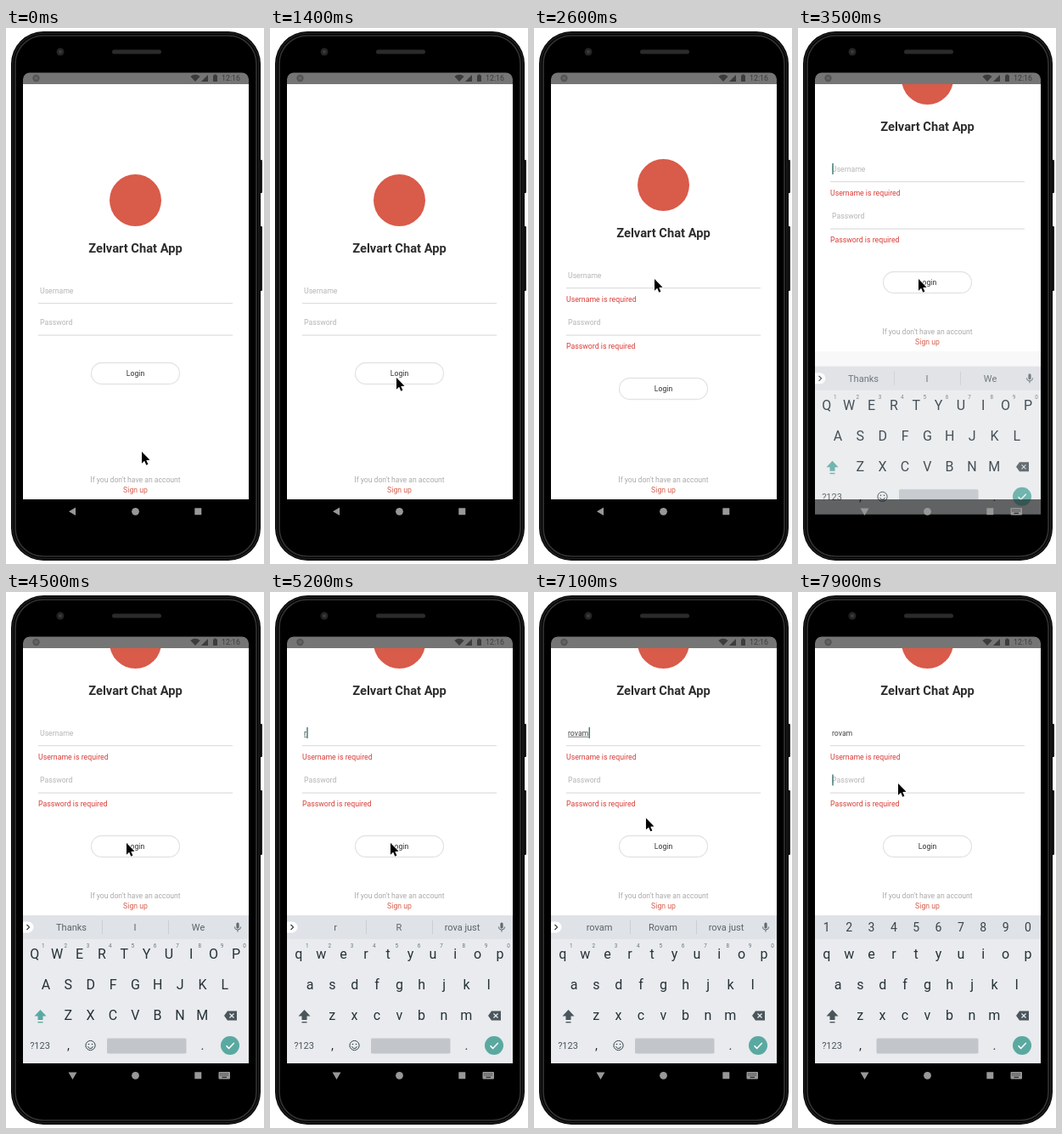
An HTML page with a canvas for the animation above (8 s loop, 304 by 630 pixels).

```html
<!DOCTYPE html>
<html lang="en">
<head>
<meta charset="utf-8">
<title>Login form</title>
<style>
html, body { margin: 0; width: 100%; height: 100%; overflow: hidden; background: #fff; }
canvas { display: block; width: 304px; height: 630px; }
</style>
</head>
<body>
<canvas></canvas>
<script>
const W = 304, H = 630, LOOP = 8000;
const RED = '#d95b4a', ERROR = '#d93d38', TEAL = '#5aa9a1', INK = '#37474f';
const NAME = 'rovam';

// Timeline in ms
const ERRORS_AT = 1650, FOCUS_AT = 2900, RESIZE_AT = 3400, KEYBOARD_AT = 3450, PASSWORD_AT = 7700;
const KEY_TIMES = [5100, 5300, 5500, 5700, 5900];
const CARET_RESETS = [FOCUS_AT, RESIZE_AT, ...KEY_TIMES, PASSWORD_AT];
const POINTER = [
  [0, 160, 498], [200, 160, 498], [1100, 149, 411], [1750, 149, 411],
  [2400, 142, 295], [6700, 142, 295], [7600, 118, 225], [LOOP, 118, 225]
];

const canvas = document.querySelector('canvas');
const dpr = window.devicePixelRatio || 1;
canvas.width = W * dpr;
canvas.height = H * dpr;
const c = canvas.getContext('2d');

const smooth = p => p * p * (3 - 2 * p);
const clamp = v => Math.max(0, Math.min(1, v));

function box(x, y, w, h, color, r = 0) {
  c.fillStyle = color;
  c.beginPath();
  c.roundRect(x, y, w, h, r);
  c.fill();
}

function outline(x, y, w, h, color, r, width = 1) {
  c.strokeStyle = color;
  c.lineWidth = width;
  c.beginPath();
  c.roundRect(x, y, w, h, r);
  c.stroke();
}

function disc(x, y, r, color) {
  c.fillStyle = color;
  c.beginPath();
  c.arc(x, y, r, 0, 7);
  c.fill();
}

function path(points, closed = true) {
  c.beginPath();
  points.forEach(([x, y]) => c.lineTo(x, y));
  if (closed) c.closePath();
}

function poly(points, color) {
  path(points);
  c.fillStyle = color;
  c.fill();
}

function line(points, color, width = 1) {
  path(points, false);
  c.strokeStyle = color;
  c.lineWidth = width;
  c.stroke();
}

// y is the middle of the capital letters
function text(str, x, y, size, color, align = 'center', weight = 400) {
  c.font = `${weight} ${size}px Roboto, sans-serif`;
  c.textAlign = align;
  c.fillStyle = color;
  c.fillText(str, x, y + size * 0.355);
  return c.measureText(str).width;
}

function drawPhone() {
  box(298, 155, 4, 39, '#1c1c1c', 1);
  box(298, 233, 4, 76, '#1c1c1c', 1);
  box(6, 4, 294, 622, '#000', 38);
  outline(8, 6, 290, 618, '#1a1a1a', 36, 2);
  outline(11, 9, 284, 612, '#333', 33, 1.6);
  box(125, 25.5, 58, 5, '#2b2b2b', 2.5);
  disc(64, 28, 4.5, '#242424');
  disc(64, 28, 2, '#3c3c3c');
}

function drawStatusBar() {
  const dark = '#3c3c3c';
  box(20, 52.5, 266, 13.5, '#757575', [8, 8, 0, 0]);
  disc(35.5, 59, 4.2, '#555');
  disc(35.5, 59, 2, '#666');
  c.fillStyle = dark;
  c.beginPath();
  c.moveTo(223, 63);
  c.arc(223, 63, 8.2, -Math.PI * 0.74, -Math.PI * 0.26);
  c.fill();
  poly([[230, 63], [238, 63], [238, 55]], dark);
  box(244, 55.5, 5, 7.5, dark, 0.7);
  box(245.3, 54.5, 2.4, 1.5, dark);
  text('12:16', 265, 59, 8.8, dark);
}

function drawCaret(x, y) {
  box(x, y - 6.5, 1.4, 13, '#39776f');
}

function drawField(label, value, y, lineY, state, focused) {
  let width = 0;
  if (value) width = text(value, 40, y, 8.7, '#444', 'left');
  else text(label, 40, y, 8.7, '#b5b5b5', 'left');
  if (value && focused) box(40, y + 4.3, width, 0.8, '#555');
  if (focused && state.caret) drawCaret(40 + width + 0.3, y);
  box(38, lineY, 229, 1.2, '#dedede');
  if (state.errors) text(label + ' is required', 38, lineY + 13.5, 8.75, ERROR, 'left');
}

function drawForm(state) {
  const spread = state.errors ? 18 : 0;
  c.save();
  c.translate(0, state.resized ? -125 : 0);
  disc(152.5, 202.5 - spread, 30.5, RED);
  text('Zelvart Chat App', 152.5, 259 - spread, 14.7, '#2d2d2d', 'center', 700);
  drawField('Username', state.typed, 308.5 - spread, 323 - spread, state, state.focus === 'user');
  drawField('Password', '', 346, 360.5, state, state.focus === 'password');
  outline(100.5, 393.5 + spread, 104, 25, '#e4e4e4', 12.5, 1.3);
  text('Login', 152.5, 406 + spread, 8.7, '#333');
  c.restore();
  const footer = state.resized ? 357 : 531;
  text("If you don't have an account", 152.5, footer, 8.6, '#a9a9a9');
  text('Sign up', 152.5, footer + 11.5, 8.7, RED);
}

function drawMic(x, y) {
  box(x - 1.6, y - 5.5, 3.2, 7, '#5f6a70', 1.6);
  c.strokeStyle = '#5f6a70';
  c.lineWidth = 1;
  c.beginPath();
  c.arc(x, y - 0.5, 3.6, 0, Math.PI);
  c.stroke();
  box(x - 0.5, y + 3, 1, 2.5, '#5f6a70');
}

function drawSuggestions(words) {
  words.forEach((word, i) => text(word, [77, 152, 226.5][i], 394, 11, '#59646a'));
  box(113, 386, 0.8, 16, '#c5c9cd');
  box(191, 386, 0.8, 16, '#c5c9cd');
  box(20, 387.5, 12.5, 13, '#fff', [0, 6.5, 6.5, 0]);
  line([[24.5, 391], [27.5, 394], [24.5, 397]], INK, 1.3);
  drawMic(273, 394);
}

function drawShift(color) {
  poly([[40.5, 491], [47.5, 498.5], [43.5, 498.5], [43.5, 503], [37.5, 503], [37.5, 498.5], [33.5, 498.5]], color);
  box(37.5, 505, 6, 1.4, color);
}

function drawBackspace() {
  poly([[257, 498], [261, 492.5], [272, 492.5], [272, 503.5], [261, 503.5]], '#4a565c');
  line([[263.5, 495.5], [268.5, 500.5]], '#e9ebee', 1.2);
  line([[268.5, 495.5], [263.5, 500.5]], '#e9ebee', 1.2);
}

function drawSmiley(x, y) {
  c.strokeStyle = INK;
  c.lineWidth = 1;
  c.beginPath();
  c.arc(x, y, 5.6, 0, 7);
  c.stroke();
  disc(x - 2, y - 1.5, 0.8, INK);
  disc(x + 2, y - 1.5, 0.8, INK);
  c.beginPath();
  c.arc(x, y + 0.5, 3, 0.2, Math.PI - 0.2);
  c.stroke();
}

function drawKeyboard(state) {
  const caps = !state.typed, password = state.focus === 'password';
  box(20, 380, 266, 174, '#e9ebee');
  box(20, 380, 266, 28, '#dfe2e6');

  [['QWERTYUIOP', 33.8, 425], ['ASDFGHJKL', 47, 461], ['ZXCVBNM', 73.2, 497]].forEach(([row, x, y]) => {
    [...row].forEach((key, i) => text(caps ? key : key.toLowerCase(), x + i * 26.35, y, 16, '#263238'));
  });
  [...'1234567890'].forEach((digit, i) => {
    const x = 33.8 + i * 26.35;
    if (password) text(digit, x, 394.5, 14, '#37434a');
    else text(digit, x + 10, 416, 6.3, '#6b757a');
  });
  if (!password) {
    drawSuggestions(caps ? ['Thanks', 'I', 'We'] : state.suggestions);
    drawSmiley(99.5, 533);
  }

  drawShift(caps ? TEAL : '#4a565c');
  drawBackspace();
  text('?123', 40, 533, 11, '#4a565c');
  text(',', 73.5, 533, 15, '#263238');
  const left = password ? 92.5 : 119;
  box(left, 524.5, 212.5 - left, 18, '#c2c6cb', 1.5);
  text('.', 231.5, 533, 15, '#263238');
  disc(264, 533, 11, TEAL);
  line([[259.5, 533.3], [262.6, 536.4], [268.8, 530]], '#fff', 1.5);
}

function drawNavigation(keyboardOpen) {
  const grey = '#989898';
  poly(keyboardOpen ? [[73.5, 564.5], [83.5, 564.5], [78.5, 573]] : [[82, 563.5], [82, 573], [74, 568.3]], grey);
  disc(152.5, 568.3, 4.4, grey);
  box(222.3, 564.3, 8, 8, grey, 0.5);
  if (!keyboardOpen) return;
  box(250.5, 564, 13.5, 8.5, grey, 1);
  for (let i = 0; i < 10; i++) box(252.3 + (i % 5) * 2.1, 565.6 + Math.floor(i / 5) * 2, 1, 1, '#111');
  box(254.5, 569.8, 5.5, 1, '#111');
}

function drawPointer(t) {
  const i = POINTER.findIndex(p => p[0] > t);
  const [t0, x0, y0] = POINTER[i - 1], [t1, x1, y1] = POINTER[i];
  const p = smooth((t - t0) / (t1 - t0));
  c.save();
  c.translate(x0 + (x1 - x0) * p, y0 + (y1 - y0) * p);
  c.scale(0.88, 0.88);
  path([[0, 0], [0, 15.5], [3.6, 12.2], [6, 17.8], [8.4, 16.8], [6, 11.3], [10.8, 11.2]]);
  c.lineJoin = 'round';
  c.strokeStyle = '#fff';
  c.lineWidth = 2;
  c.stroke();
  c.fillStyle = '#000';
  c.fill();
  c.restore();
}

function stateAt(t) {
  const typed = NAME.slice(0, KEY_TIMES.filter(k => k <= t).length);
  const lastReset = CARET_RESETS.filter(k => k <= t).pop();
  const capital = typed.charAt(0).toUpperCase() + typed.slice(1);
  return {
    typed,
    suggestions: [typed, capital, NAME.slice(0, 4) + ' just'],
    errors: t >= ERRORS_AT,
    resized: t >= RESIZE_AT,
    focus: t >= PASSWORD_AT ? 'password' : t >= FOCUS_AT ? 'user' : '',
    caret: (t - lastReset) % 1111 < 555
  };
}

function draw(t) {
  const state = stateAt(t);
  c.setTransform(dpr, 0, 0, dpr, 0, 0);
  box(0, 0, W, H, '#fff');
  drawPhone();

  box(20, 60, 266, 494, '#fff');
  c.save();
  c.beginPath();
  c.rect(20, 66, 266, 488);
  c.clip();
  drawForm(state);
  if (state.resized) box(20, 380, 266, 174, '#f8f8f8');
  c.restore();

  if (t >= KEYBOARD_AT) {
    const p = clamp((t - KEYBOARD_AT) / 250);
    c.save();
    c.globalAlpha = 0.8 + 0.2 * p;
    c.translate(0, 20 * (1 - smooth(p)));
    drawKeyboard(state);
    c.restore();
    // The navigation bar shades the keyboard while it slides in
    box(20, 554, 266, 24, 'rgba(0, 0, 0, 0.5)');
  }
  drawNavigation(state.resized);
  drawStatusBar();
  drawPointer(t);
}

function tick() {
  draw(performance.now() % LOOP);
  requestAnimationFrame(tick);
}
tick();
</script>
</body>
</html>
```
